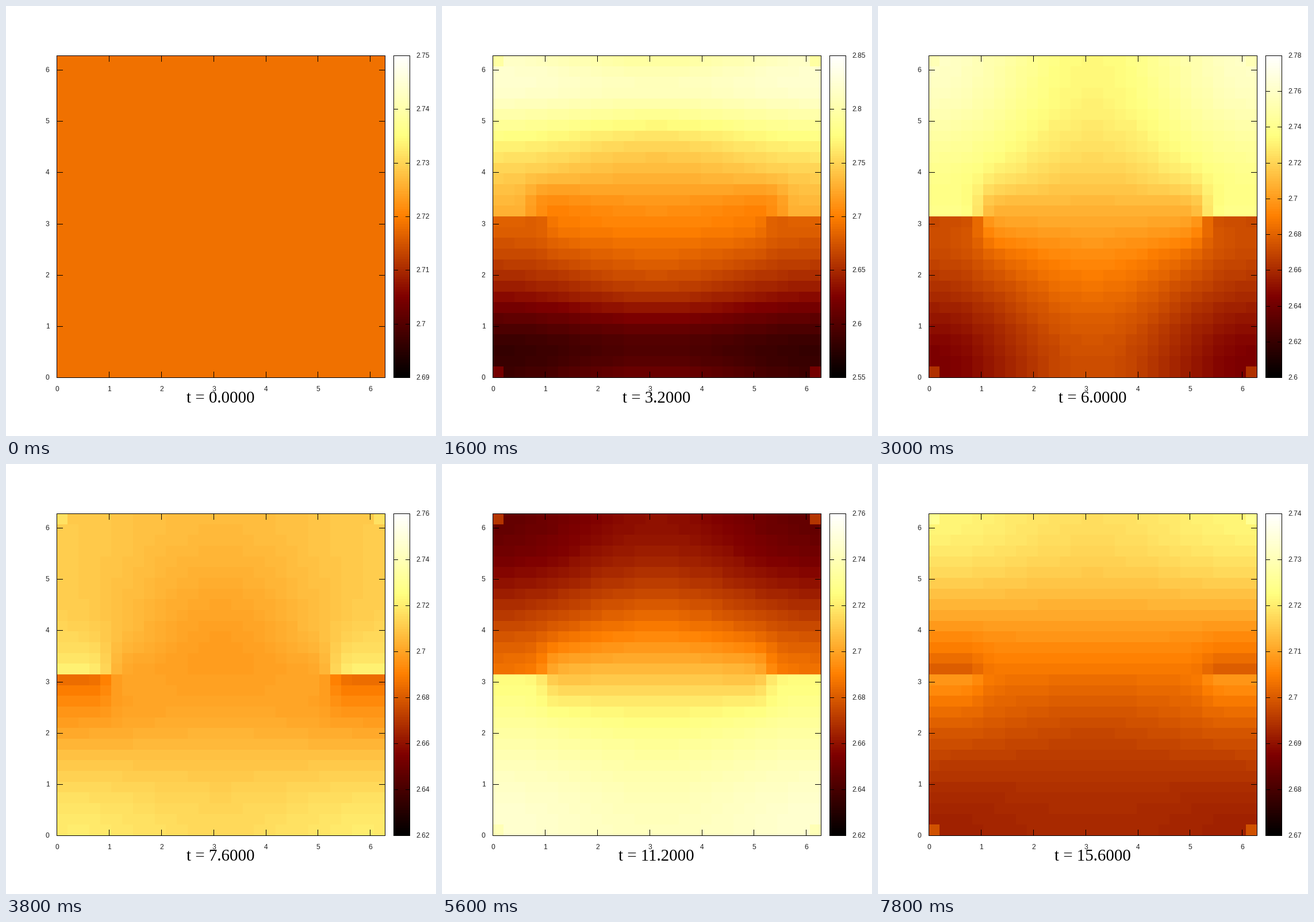
A matplotlib script that plays this animation: 748 by 748 pixels, repeating every 8000 ms.

```python
import math

import matplotlib.pyplot as plt
import numpy as np
from matplotlib.animation import FuncAnimation
from matplotlib.collections import LineCollection
from matplotlib.colors import ListedColormap

SIZE, DPI = 748, 100
PT = 72 / DPI
FRAMES, INTERVAL, DT = 40, 200, 0.4
N = 30
L = 2 * math.pi
REST, MEAN = math.e, 2.7045
LEFT, RIGHT, TOP, BOTTOM = 88.5, 659.5, 86.5, 646.5
BAR_L, BAR_R = 674.5, 702.5

# Grid of cells: d is the distance from the barrier, from 0 to 1
mid = (np.arange(N) + 0.5) * L / N
x, y = np.meshgrid(mid, mid)
xe = np.minimum(x, L - x)
d = np.abs(y - math.pi) / math.pi
side = np.sign(y - math.pi)


def sigmoid(v):
    return 1 / (1 + np.exp(-v))


def decay(t, amp, rate, omega, peak):
    """Damped oscillation with a crest near the given time."""
    return amp * math.exp(-rate * t) * math.cos(omega * (t - peak))


# Shapes of the modes; the barrier stands at both walls and is open between
half = np.sin(math.pi * d / 2)
wall = (1 + np.cos(x)) / 2
near = np.exp(-(d / 0.22) ** 2)
stub = near * sigmoid((1 - xe) / 0.1) + (1 - near) * wall
JUMP = side * np.exp(-d / 0.42) * stub
CROSS = side * half ** 2 * wall
EVEN = np.cos(math.pi * d) - 0.8 * wall
TIP = (sigmoid((xe - 0.68) / 0.06) * np.exp(-np.maximum(xe - 0.9, 0))
       * np.exp(-((y - 3.4) / 0.4) ** 2))


def field(t):
    """Sloshing through the opening plus the first pulse running outward."""
    if t == 0:
        return np.full((N, N), REST)
    onset = 1 - math.exp(-(t / 0.9) ** 2)
    modes = (decay(t, 0.072, 0.05, 0.43, 3.75) * side * half
             + decay(t, 0.0565, 0.08, 0.44, 5.6) * JUMP
             + decay(t, 0.146, 0.25, 0.6, 4.8) * CROSS
             + decay(t, 0.0156, 0.12, 0.95, 4.6) * EVEN)
    s = t / 1.6
    burst = (s * math.exp(1 - s)) ** 2
    pulse = side * np.exp(-((d - 0.4 * s) / 0.25) ** 2) * (1 - 0.5 * wall)
    z = MEAN + (REST - MEAN) * math.exp(-t / 1.5)
    z = z + onset * modes + burst * (0.09 * pulse - 0.035 * TIP)
    # Corner points stay almost still
    for row, still in ((0, REST), (-1, 2.735)):
        for col in (0, -1):
            z[row, col] += (still - z[row, col]) / 4
    return z


def colour_range(t):
    """Round the data extremes outward to whole tics."""
    lo = np.interp(t, [0, 1.6, 4.8, 7.6, 11.2, 15.6],
                   [0.99 * REST, 2.53, 2.58, 2.63, 2.635, 2.675])
    hi = np.interp(t, [0, 1.6, 4.8, 8, 15.6],
                   [1.01 * REST, 2.87, 2.785, 2.748, 2.732])
    power = 10 ** math.floor(math.log10(hi - lo))
    count = 20 * power / (hi - lo)
    for limit, step in ((40, .05), (20, .1), (10, .2), (4, .5), (2, 1), (0, 2)):
        if count > limit:
            break
    step *= power
    first = math.floor(lo / step + 1e-6)
    last = math.ceil(hi / step - 1e-6)
    return first * step, last * step, [i * step for i in range(first, last + 1)]


ramp = np.linspace(0, 1, 128)
cmap = ListedColormap(np.clip(np.array([2 * ramp, 2 * ramp - 0.5, 2 * ramp - 1]).T, 0, 1))

fig = plt.figure(figsize=(SIZE / DPI, SIZE / DPI), dpi=DPI, facecolor="white")
ax = fig.add_axes([0, 0, 1, 1])
ax.axis("off")


def pixel(v):
    return math.floor(v + 1e-6) + 0.5


def lines(segments):
    coll = LineCollection(segments, colors="black", linewidths=PT,
                          antialiaseds=False, zorder=3)
    coll.set_snap(False)
    ax.add_collection(coll)
    return coll


def label(px, py, text, ha):
    return ax.text(px, py, text, ha=ha, va="baseline", color="#202020",
                   family="Liberation Sans", size=12 * PT, zorder=4)


def box(x0, x1):
    return [(x0, TOP), (x1, TOP), (x1, BOTTOM), (x0, BOTTOM), (x0, TOP)]


style = dict(cmap=cmap, aspect="auto", interpolation="nearest", origin="lower")
heat = ax.imshow(field(0), extent=(LEFT, RIGHT, BOTTOM, TOP), **style)
ax.imshow(ramp[:, None], extent=(BAR_L, BAR_R, BOTTOM, TOP), **style)
ax.set_xlim(0, SIZE)
ax.set_ylim(SIZE, 0)

marks = [box(LEFT, RIGHT), box(BAR_L, BAR_R)]
for n in range(7):
    px = pixel(LEFT + n * (RIGHT - LEFT) / L)
    py = pixel(BOTTOM - n * (BOTTOM - TOP) / L)
    marks += [[(px, BOTTOM), (px, BOTTOM - 10)], [(px, TOP), (px, TOP + 10)],
              [(LEFT, py), (LEFT + 10, py)], [(RIGHT, py), (RIGHT - 10, py)]]
    label(px, 670, str(n), "center")
    label(75.5, py + 3.8, str(n), "right")
lines(marks)

bar_tics = lines([])
bar_labels = [label(713, 0, "", "left") for _ in range(16)]
clock = ax.text(373, 690.5, "", ha="center", va="baseline", color="black",
                family="Liberation Serif", size=29 * PT, zorder=5)


def update(i):
    t = i * DT
    lo, hi, tics = colour_range(t)
    heat.set_data(field(t))
    heat.set_clim(lo, hi)
    segments = []
    for item in bar_labels:
        item.set_text("")
    for item, v in zip(bar_labels, tics):
        py = pixel(BOTTOM - (v - lo) / (hi - lo) * (BOTTOM - TOP))
        segments += [[(BAR_L, py), (BAR_L + 7, py)], [(BAR_R, py), (BAR_R - 7, py)]]
        item.set_text(f"{round(v, 6):g}")
        item.set_y(py + 3.8)
    bar_tics.set_segments(segments)
    clock.set_text(f"t = {t:.4f}")
    return [heat, bar_tics, clock, *bar_labels]


anim = FuncAnimation(fig, update, frames=FRAMES, interval=INTERVAL,
                     init_func=lambda: update(0), repeat=True, repeat_delay=0)
plt.show()
```
